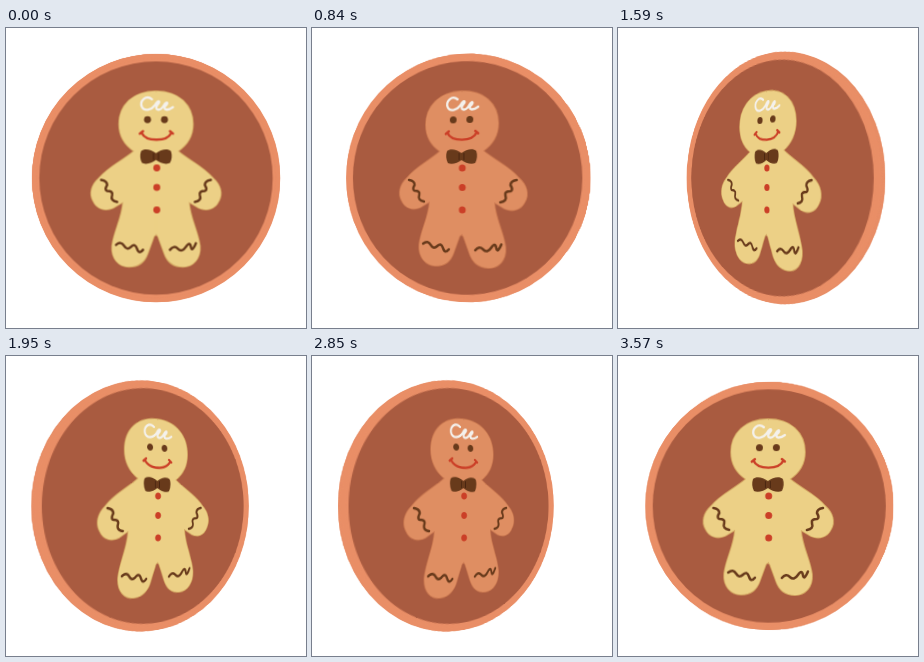
These frames come from a looping animation (300x300 px, 3.6 s). An HTML page:

```html
<!DOCTYPE html>
<html lang="en">
<head>
<meta charset="utf-8">
<title>Gingerbread coin</title>
<style>
html, body { margin: 0; width: 100%; height: 100%; overflow: hidden; background: #fff; }
#stage { position: absolute; left: 0; top: 0; width: 300px; height: 300px; overflow: hidden; perspective: 424px; perspective-origin: 150px 150px; }
#coin { position: absolute; left: 0; top: 0; width: 300px; height: 300px; transform-style: preserve-3d; }
.rim { position: absolute; left: 27px; top: 27px; width: 246px; height: 246px; box-sizing: border-box; border-radius: 50%; border: 4px solid var(--side); }
.edge { border-color: #e98e66; }
.face { position: absolute; left: 0; top: 0; width: 300px; height: 300px; backface-visibility: hidden; }
.face svg { display: block; }
</style>
</head>
<body>
<div id="stage"><div id="coin"></div></div>
<script>
const coin = document.getElementById('coin');
const HALF = 3.8;   // half the rim's thickness
const SUNK = 2.6;   // height of the faces inside the rim
const DEPTH = 424;  // viewing distance
const STEP = 30, LOOP = 3600;
const TURN = 717.5 / 119; // degrees per step
const LIGHT = [233, 142, 102], DARK = [187, 98, 63];

// Right half of the cookie; the left half is its mirror image.
const half = 'M150 63C173 63 187 77 187 96C187 108 181 117 172 123' +
  'C181 131 198 139 207 150C215 157 217 166 213 173C209 182 200 183 193 180' +
  'Q188 177 183 174C184 190 192 203 194 218C195 231 187 239 177 239' +
  'C167 239 161 233 158.5 226L153 211Q152 207 150 207';
const arm = 'M95 152Q101 153 101 157Q98 162 101 163Q107 163 106 167Q104 173 111 174';
const legs = 'M110 217Q115 213 118 218T125 219T131 221T137 222' +
  'M164 222Q168 217 172 221T180 219T185 219T190 215.5';

const line = (d, color, width) =>
  `<path d="${d}" fill="none" stroke="${color}" stroke-width="${width}" stroke-linecap="round" stroke-linejoin="round"/>`;
const dot = (x, y, r, color) => `<circle cx="${x}" cy="${y}" r="${r}" fill="${color}"/>`;
const mirrored = s => `<g>${s}</g><g transform="matrix(-1 0 0 1 300 0)">${s}</g>`;

function art(dough, crust) {
  const brown = '#683a1b', red = '#cb3f27', icing = '#f4f1ec';
  return `<svg width="300" height="300" viewBox="0 0 300 300">` +
    dot(150, 150, 123.5, '#e98e66') + dot(150, 150, 117, '#a95b40') +
    mirrored(line(half, crust, 1.8) + `<path d="${half}Z" fill="${dough}"/>`) +
    `<path d="M150 64V206" stroke="${dough}" stroke-width="2"/>` +
    line('M146 71C140 66 133 73 136 79C139 84 146 81 149 77C152 71 155 73 152 76' +
      'C147 82 154 84 158 77C161 72 163 75 159 78C157 83 163 82 167 79', icing, 2.3) +
    mirrored(dot(141.5, 91.5, 3.5, brown)) +
    line('M135.5 104.5C140 114 161 114 165.5 104.5M133.8 105.5L137 103M164 103L167 105.5', red, 2.4) +
    `<path d="M150 125C145 121 138 120 135 123Q133 129 136 135C140 137 146 135 150 132` +
    `C154 135 160 137 164 135Q167 129 165 123C162 120 155 121 150 125Z" fill="${brown}"/>` +
    line('M147.5 125.5V131.5M152.5 125.5V131.5', '#492510', 1) +
    [140, 159.5, 182].map(y => dot(150.8, y, 3.5, red)).join('') +
    mirrored(line(arm, brown, 2.5)) + line(legs, brown, 2.5) + '</svg>';
}

function add(name, transform, html = '') {
  const el = document.createElement('div');
  el.className = name;
  el.style.transform = transform;
  el.innerHTML = html;
  coin.append(el);
}

for (let i = -5; i <= 5; i++) {
  add(Math.abs(i) > 4 ? 'rim edge' : 'rim', `translateZ(${i * HALF / 5}px)`);
}
const place = `translateZ(${SUNK}px) scale(${(DEPTH - HALF) / DEPTH})`;
add('face', place, art('#ecd086', '#d3a561'));
add('face', `rotateY(180deg) ${place}`, art('#df8e62', '#c9774f'));

function draw(time) {
  const angle = Math.floor((time % LOOP) / STEP) * TURN;
  // The side darkens as the coin turns edge-on.
  const shade = Math.sin(angle * Math.PI / 180) ** 8;
  const side = LIGHT.map((c, i) => Math.round(c + (DARK[i] - c) * shade));
  coin.style.setProperty('--side', `rgb(${side})`);
  coin.style.transform = `rotateY(${angle}deg)`;
}

const start = performance.now();
function tick() {
  draw(performance.now() - start);
  requestAnimationFrame(tick);
}
tick();
</script>
</body>
</html>
```
